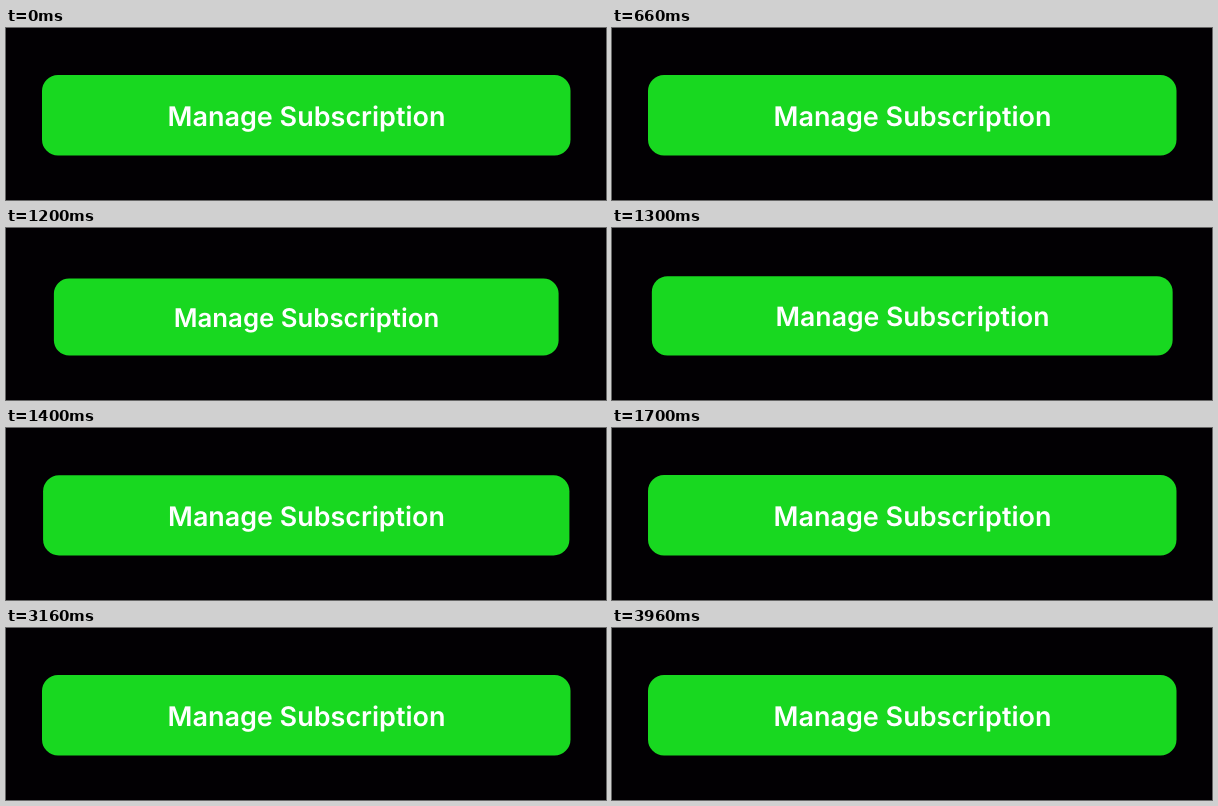
An HTML page that plays this animation: 600x172 px, repeating every 4000 ms.

```html
<!DOCTYPE html>
<html lang="en">
<head>
<meta charset="utf-8">
<title>Button press</title>
<style>
  html, body { margin: 0; width: 100%; height: 100%; overflow: hidden; background: #020003; }
  svg { display: block; width: 100vw; height: 100vh; }
  text { font: 600 27px Inter, "Liberation Sans", sans-serif; fill: #fff; text-anchor: middle; text-rendering: geometricPrecision; }
</style>
</head>
<body>
<svg viewBox="0 0 600 172">
  <g id="button">
    <rect x="36" y="47" width="528.5" height="80.5" rx="16" fill="#18d820"/>
    <text x="300.5" y="97.5">Manage Subscription</text>
  </g>
</svg>
<script>
  const LOOP = 4000, PRESS = 660, RELEASE = 1084;
  const DEPTH = 0.1, STIFFNESS = 0.0157;
  const ANCHOR = { x: 300.25, y: 127.5 };
  const button = document.getElementById('button');

  // Progress of a critically damped spring, 0 to 1
  function spring(ms) {
    const s = Math.max(0, ms) * STIFFNESS;
    return 1 - (1 + s) * Math.exp(-s);
  }

  function draw(t) {
    const scale = 1 - DEPTH * (spring(t - PRESS) - spring(t - RELEASE));
    button.setAttribute('transform',
      `translate(${ANCHOR.x} ${ANCHOR.y}) scale(${scale}) translate(${-ANCHOR.x} ${-ANCHOR.y})`);
  }

  const start = performance.now();
  function tick() {
    draw((performance.now() - start) % LOOP);
    requestAnimationFrame(tick);
  }
  tick();
</script>
</body>
</html>
```
